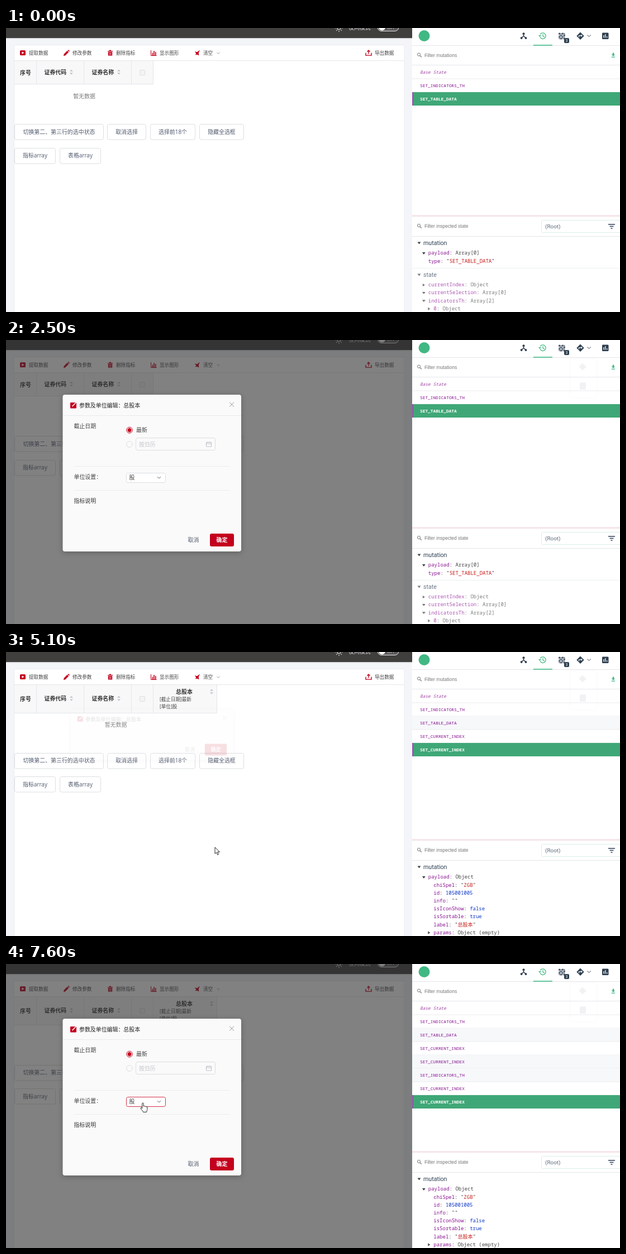
Recreate the animation shown at these times as an HTML page. Size 1099 by 509 pixels, loop 8000 ms.

```html
<!DOCTYPE html>
<html lang="zh">
<head>
<meta charset="utf-8">
<title>Table and mutation log</title>
<style>
html, body { margin: 0; width: 100%; height: 100%; overflow: hidden; background: #fff; }
svg { display: block; width: 1099px; height: 509px; font-family: "Open Sans", "Noto Sans CJK SC", "Noto Sans CJK", sans-serif; }
.mono { font-family: "Noto Sans Mono", "Noto Sans CJK SC", monospace; white-space: pre; }
.field { font-family: "Liberation Sans", sans-serif; }
.ui { font-family: Roboto, sans-serif; }
.dialog { filter: drop-shadow(0 2px 5px rgba(0, 0, 0, .25)); }
</style>
</head>
<body>
<svg id="stage" viewBox="0 0 1099 509"></svg>
<script>
const LOOP = 8000, STEP = 100;
const RED = '#c4001d', GREEN = '#3fa777', INK = '#2c3e50', PURPLE = '#881391';
const LINE = '#e4e6ea', BORDER = '#dcdee2';

// [time, x, y, hand]; no position hides the pointer
const POINTER = [
  [0], [200, 1042, 2], [300, 1033, 14, 1], [400, 960, 40], [500, 800, 90], [600, 620, 130],
  [700, 420, 165], [800, 190, 184], [900, 31, 188], [1000],
  [2800, 217, 300], [2900, 288, 313], [3000, 335, 322], [3100, 358, 328], [3200, 367, 327],
  [3300, 365, 322], [3400, 302, 288], [3500, 247, 256], [3600, 245, 249, 1],
  [4000, 247, 253, 1], [4100, 255, 262], [4200, 275, 285], [4300, 305, 312], [4400, 335, 335],
  [4500, 357, 346], [4600, 368, 350, 1], [4700, 374, 351, 1], [5000, 374, 350],
  [5400, 345, 340], [5500, 270, 310], [5600, 180, 270], [5700, 90, 235], [5800, 8, 215], [5900],
  [7200, 54, 225], [7300, 130, 240], [7400, 200, 251], [7500, 238, 257], [7600, 245, 249, 1]
];
// [time, dialog progress, mask progress]
const MODAL = [
  [0, 0, 0], [2300, .35, .38], [2400, .84, .84], [2500, 1, 1],
  [5000, .62, .55], [5100, .12, 0], [5200, 0, 0], [6800, .5, .52], [6900, 1, 1]
];
const LOG = ['Base State', 'SET_INDICATORS_TH', 'SET_TABLE_DATA', 'SET_CURRENT_INDEX',
  'SET_CURRENT_INDEX', 'SET_INDICATORS_TH', 'SET_CURRENT_INDEX', 'SET_CURRENT_INDEX'];
// [time, active row, inspector view]
const ACTIVE = [[0, 2, 'table'], [2700, 4, 'index'], [5400, 5, 'heads'], [7100, 7, 'index']];

// [depth, arrow, key, value, kind]
const STATE = [[1, '>', 'currentIndex', 'Object'], [1, 'v', 'currentSelection', 'Array[0]'],
  [1, 'v', 'indicatorsTh', 'Array[2]'], [2, '>', '0', 'Object']];
const VIEWS = {
  table: [[1, 'v', 'payload', 'Array[0]'], [1, '', 'type', 'SET_TABLE_DATA', 's']],
  heads: [[1, 'v', 'payload', 'Array[1]'], [2, '>', '0', 'Object'], [1, '', 'type', 'SET_INDICATORS_TH', 's']],
  index: [[1, 'v', 'payload', 'Object'], [2, '', 'chiSpel', 'ZGB', 's'], [2, '', 'id', '105001005', 'n'],
    [2, '', 'info', '', 's'], [2, '', 'isIconShow', 'false', 'n'], [2, '', 'isSortable', 'true', 'n'],
    [2, '', 'label', '总股本', 's'], [2, '>', 'params', 'Object (empty)']]
};

const at = (table, t) => table.filter(row => row[0] <= t).pop();
const rect = (x, y, w, h, fill, more = '') => `<rect x="${x}" y="${y}" width="${w}" height="${h}" fill="${fill}" ${more}/>`;
const box = (x, y, w, h, stroke = BORDER, fill = '#fff', r = 3) =>
  rect(x + .5, y + .5, w - 1, h - 1, fill, `stroke="${stroke}" rx="${r}"`);
const fill = (d, c, more = '') => `<path d="${d}" fill="${c}" ${more}/>`;
const line = (d, c, w = 1) => `<path d="${d}" fill="none" stroke="${c}" stroke-width="${w}"/>`;
const dot = (x, y, r, c, more = '') => `<circle cx="${x}" cy="${y}" r="${r}" fill="${c}" ${more}/>`;
const text = (x, mid, s, size = 9.94, c = '#444', more = '') =>
  `<text x="${x}" y="${mid + size * .37}" font-size="${size}" fill="${c}" ${more}>${s}</text>`;
const MID = 'text-anchor="middle"', BOLD = 'font-weight="700"';
const chevron = (x, y, c, r = 3) => line(`M${x - r} ${y - r / 2}l${r} ${r}l${r} ${-r}`, c, 1);
const sorter = (x, y) => fill(`M${x - 3} ${y - 1.3}h6l-3-3.2zM${x - 3} ${y + 1.3}h6l-3 3.2z`, '#c0c4cc');

function topBar() {
  let rays = '';
  for (let i = 0; i < 8; i++) {
    const a = i * Math.PI / 4, c = Math.cos(a), s = Math.sin(a);
    rays += `M${596 + 5 * c} ${5 * s}L${596 + 7 * c} ${7 * s}`;
  }
  return rect(0, 0, 727, 509, '#f4f5f8') + rect(0, 18, 727, 2, '#e3e4e8') + rect(0, 0, 727, 18, '#413e3e') +
    line(rays, '#ddd', 1.2) + dot(596, 0, 3, 'none', 'stroke="#ddd" stroke-width="1.2"') +
    text(613, -1, '夜间模式', 9.94, '#ddd') +
    rect(665, -8.5, 38, 14, '#5a5757', 'rx="7" stroke="#eee"') + dot(673, -1.5, 6, '#fff') +
    text(682, -1, 'OFF', 8, '#eee');
}

function toolbar() {
  const items = [[41, '提取数据'], [119, '修改参数'], [197, '删除指标'], [275, '显示图形'], [353, '清空'], [660, '导出数据']];
  return rect(25, 40, 10, 9, RED, 'rx="1.5"') + fill('M28.5 42.2l4 2.3-4 2.3z', '#fff') +
    fill('M103 50l.7-3.2 6-6 2.4 2.4-6 6zM110.4 40l1.2-1.1 2.5 2.4-1.2 1.2z', RED) +
    fill('M182 41h9v1.3h-9zM185 39.5h3v1.5h-3zM182.8 43h7.4v6.6h-7.4z', RED) +
    line('M185.3 44.3v4M187.7 44.3v4', '#fff', .8) +
    line('M259.5 40v9.5h10', RED) + line('M262.3 44.5v4.5M265 41v8M267.8 43v6', RED, 1.6) +
    fill('M338 42l4 1.2 5-3.8-2.3 5.4.6 4.6-3.2-2-3.2 1 1.3-2.8z', RED) +
    line('M644 44.5v4.6h10v-4.6M649 46.5v-6M646.5 42.6l2.5-2.6 2.5 2.6', RED, 1.4) +
    items.map(([x, s]) => text(x, 45, s, 8.6)).join('') + chevron(380, 45, '#999', 2.6) +
    rect(15, 58, 697, 1, LINE);
}

function grid(wide) {
  const dy = wide ? 8.5 : 0, mid = 79 + dy / 2, h = wide ? 50 : 41, right = wide ? 377 : 263;
  const button = (x, y, w, s) => box(x, Math.round(y + dy), w, 28.5) + text(x + w / 2, y + dy + 14, s, 9.94, '#515a6e', MID);
  const edges = [54, 139, 224, 263].concat(wide ? 377 : []);
  return rect(15, 59, right - 15, h, '#f8f8f9') + rect(15, 59 + h, right - 14, 1, LINE) +
    edges.map(x => rect(x, 59, 1, h, LINE)).join('') +
    text(35, mid + 1, '序号', 9.94, '#333', MID + BOLD.padStart(18)) +
    text(68.5, mid, '证券代码', 9.94, '#333', BOLD) + sorter(117, mid) +
    text(153.5, mid, '证券名称', 9.94, '#333', BOLD) + sorter(202, mid) +
    box(239, Math.round(mid) - 4, 10, 10, BORDER, '#f3f3f3', 1) +
    (wide ? text(319, 71, '总股本', 9.94, '#333', MID + ' ' + BOLD) + sorter(368, 71) +
      text(275, 85, '[截止日期]最新', 8.55) + text(275, 98, '[单位]股', 8.55) : '') +
    text(wide ? 196.5 : 140, 122 + dy, '暂无数据', 9.94, '#777', MID) +
    button(15, 172, 160, '切换第二、第三行的选中状态') + button(181, 172, 70, '取消选择') +
    button(258, 172, 81, '选择前18个') + button(346, 172, 80, '隐藏全选框') +
    button(15, 214.5, 74, '指标array') + button(96, 214.5, 74, '表格array');
}

function dialog(t) {
  const [, p, shade] = at(MODAL, t);
  if (!p) return '';
  const closing = t >= 5000 && t < 6800, cut = closing ? 181 : 0, h = 281 - cut;
  const overSelect = t >= 3600 && t < 4100 || t >= 7600;
  const overOk = t >= 4700 && t < 5000;
  const cy = 98 + h / 2, scale = .9 + .1 * p;
  const body = closing ? '' :
    text(121.5, 154, '截止日期') +
    dot(221, 161.5, 5.3, '#fff', `stroke="${RED}"`) + dot(221, 161.5, 3.5, RED) + text(233, 161.5, '最新') +
    dot(221, 187, 5.3, '#fafafa', `stroke="${BORDER}"`) +
    box(232, 175, 143, 23, BORDER, '#fafafa') + text(238, 187, '按日历', 9.94, '#c0c3ca') +
    line('M358.5 183.5h9v7.5h-9zM358.5 186h9M361 182v2M365 182v2', '#b5b8c0', .9) +
    rect(121, 226, 280, 1, '#eceef0') +
    text(121.5, 245.5, '单位设置：') + box(215, 238, 71, 18, overSelect ? '#d0314a' : BORDER) +
    text(220.5, 246.5, '股') + chevron(274, 246.5, '#666') +
    rect(121, 269, 280, 1, '#eceef0') + text(121.5, 288, '指标说明', 9.94, '#333', 'font-weight="500"');
  return rect(0, 0, 727, 509, '#2d2d2d', `opacity="${.6 * shade}"`) +
    `<g class="dialog" opacity="${p}" transform="translate(261 ${cy}) scale(${scale}) translate(-261 ${-cy})">` +
    rect(101.5, 98, 319.5, h, '#fafafa', 'rx="4"') +
    rect(115, 112, 11, 10.5, RED, 'rx="1"') + line('M118.5 119l6.8-7', '#fafafa', 1.6) +
    text(131, 117.5, '参数及单位编辑：总股本', 9.94, '#222') +
    line('M400 111.5l8 8M408 111.5l-8 8', '#888', .9) + rect(102, 135, 319, 1, '#e8eaec') + body +
    `<g transform="translate(0 ${-cut})">` + text(335.5, 358.5, '取消', 9.94, '#515a6e', MID) +
    rect(365, 347, 43, 23, overOk ? '#c8233c' : RED, 'rx="3"') + text(386.5, 358.5, '确定', 9.94, '#fff', MID + ' ' + BOLD) +
    '</g></g>';
}

const search = y => dot(739, y - 1, 2.6, 'none', 'stroke="#777"') + line(`M741 ${y + 1}l2.8 2.8`, '#777', 1.2);

function devTabs(t) {
  let dots = '';
  for (let i = 0; i < 16; i++) dots += dot(990.5 + i % 4 * 3, 10 + (i >> 2) * 3, (i + (i >> 2)) % 2 ? .9 : 1.6, INK);
  const menuOpacity = t < 300 ? 0 : t < 500 ? 1 : .06;
  const menu = `<g opacity="${menuOpacity}">` + box(1009, 33, 49, 71, '#bbb') +
    fill('M1032 41.5l6.5 6.5-6.5 6.5-6.5-6.5z', INK) + rect(1027, 76, 11, 13, INK, 'rx="1"') + '</g>';
  return rect(727, 0, 372, 509, '#fff') + dot(748.5, 14, 10, '#41b883') +
    line('M926.5 10v4l-4 4.5M926.5 14l4 4.5', INK, 1.4) + dot(926.5, 10.3, 2, INK) +
    dot(922.6, 18, 1.9, INK) + dot(930.4, 18, 1.9, INK) +
    line('M956 16.5a5.3 5.3 0 1 0 .1-5M961 11v3.5l2.6 1.6', '#42b983', 1.3) + fill('M953 13h5l-2.5 3z', '#42b983') +
    dots + rect(999, 18, 9, 9, INK, 'rx="2"') + text(1003.5, 22.5, '3', 7, '#fff', MID + ' class="ui"') +
    fill('M1028 7.5l6.7 6.7-6.7 6.7-6.7-6.7z', INK) + line('M1025.5 16.5v-2.8h4.2', '#fff', 1.2) +
    fill('M1029.3 11.3l2.6 2.4-2.6 2.4z', '#fff') + chevron(1043.5, 14, INK, 3.2) +
    rect(1067, 8.5, 11.5, 11.5, INK, 'rx="1.3"') + line('M1070 13v4.5M1072.8 11v6.5M1075.6 15v2.5', '#fff', 1.3) +
    rect(727, 31, 372, 1, LINE) + rect(944, 30, 34, 1.5, '#42b983') +
    search(48.5) + text(749, 48.5, 'Filter mutations', 8.52, '#777', 'class="field"') +
    fill('M1085.7 44.5h2.6v3h2l-3.3 3.2-3.3-3.2h2zM1083.7 51.5h6.6v1.2h-6.6z', '#42b983') +
    rect(727, 66, 372, 1, LINE) + menu;
}

function log(active, t) {
  const past = ACTIVE.filter(a => a[0] <= t).map(a => a[1]);
  return LOG.slice(0, active + 1).map((s, i) => {
    const y = 67 + 24 * i, on = i === active;
    const bg = on ? GREEN : past.includes(i) ? '#f6f8fa' : '';
    return (bg ? rect(727, y, 372, 24, bg) : '') + (on ? rect(727, y, 2.5, 24, '#8f5ba8') : rect(727, y + 23.5, 372, 1, '#eaecee')) +
      text(741, y + 12, s, 7.84, on ? '#fff' : PURPLE, `class="mono" ${on ? 'font-weight="600"' : ''} ${i ? '' : 'font-style="italic" opacity=".8"'}`);
  }).join('');
}

function arrow(kind, x, y) {
  if (!kind) return '';
  return fill(kind === 'v' ? `M${x - 3} ${y - 1.5}h6l-3 4z` : `M${x - 2} ${y - 2.5}v5.4l4-2.7z`, '#444');
}

function treeRow([depth, kind, key, value, type], y) {
  const x = 746.3 + depth * 9.5, quote = type === 's' ? '<tspan fill="#444">"</tspan>' : '';
  const color = { s: '#c41a16', n: '#0b36c4' }[type] || '#444';
  return arrow(kind, x - 8, y + .5) + text(x, y, `<tspan fill="${PURPLE}">${key}</tspan>: ${quote}<tspan fill="${color}">${value}</tspan>${quote}`,
    9, '#444', 'class="mono"');
}

function inspector(view) {
  const rows = VIEWS[view], rowsAt = (list, y) => list.map((r, i) => treeRow(r, y + 14.2 * i)).join('');
  const cut = 387.5 + 14.2 * rows.length + 14;
  const head = (y, s) => arrow('v', 739.5, y) + text(747, y, s, 10.65, INK, 'class="ui"');
  const filter = line('M1078 352h12M1080.5 355.5h7M1082.5 359h3', INK, 1.3);
  return rect(727, 335, 372, 3, '#f6e7ea') + rect(727, 338, 372, 1, '#faf4f5') +
    search(355) + text(749, 355, 'Filter inspected state', 8.52, '#777', 'class="field"') +
    box(958, 344, 145, 23, '#dcefe7', '#fff', 2) + text(965, 355, '(Root)', 9.94, '#5c6b7a', 'class="ui"') + filter +
    rect(727, 373, 372, 1, LINE) + head(385, 'mutation') + rowsAt(rows, 403) +
    (view === 'index' ? '' : rect(727, Math.round(cut), 372, 1, '#eceef0') +
      `<g opacity=".7">${head(cut + 12, 'state')}${rowsAt(STATE, cut + 30)}</g>`);
}

function pointer(t) {
  const [, x, y, hand] = at(POINTER, t);
  if (x === undefined) return '';
  const d = hand ?
    'M-1.3 1.2c0-1.6 2.5-1.6 2.5 0v5c.4-1 2.2-.9 2.4.3.6-.8 2.1-.5 2.3.6.8-.6 2 0 2 1.1v3.2c0 1.5-1 2.2-1.2 5H.6C.3 14.300-3.200 11.600-4 9.800c-.5-1.300 1.100-2 2.700.1z' :
    'M0 0v11.500l2.700-2.500 1.900 4.500 2-.9-1.900-4.300h3.700z';
  return fill(d, '#fff', `stroke="#111" stroke-width=".9" stroke-linejoin="round" transform="translate(${x} ${y})"`);
}

function scene(t) {
  const [, active, view] = at(ACTIVE, t);
  return topBar() + rect(14, 30, 699.5, 485, '#e9ebef', 'rx="2"') + rect(15, 31, 697.5, 480, '#fff') +
    toolbar() + grid(t >= 5000) + dialog(t) +
    devTabs(t).replace(/^/, '') + log(active, t) + inspector(view) +
    // the tab menu floats above the log
    pointer(t);
}

const stage = document.getElementById('stage');
let shown = -1;
function tick() {
  const t = Math.floor(performance.now() % LOOP / STEP) * STEP;
  if (t !== shown) stage.innerHTML = scene(shown = t);
  requestAnimationFrame(tick);
}
tick();
</script>
</body>
</html>
```
